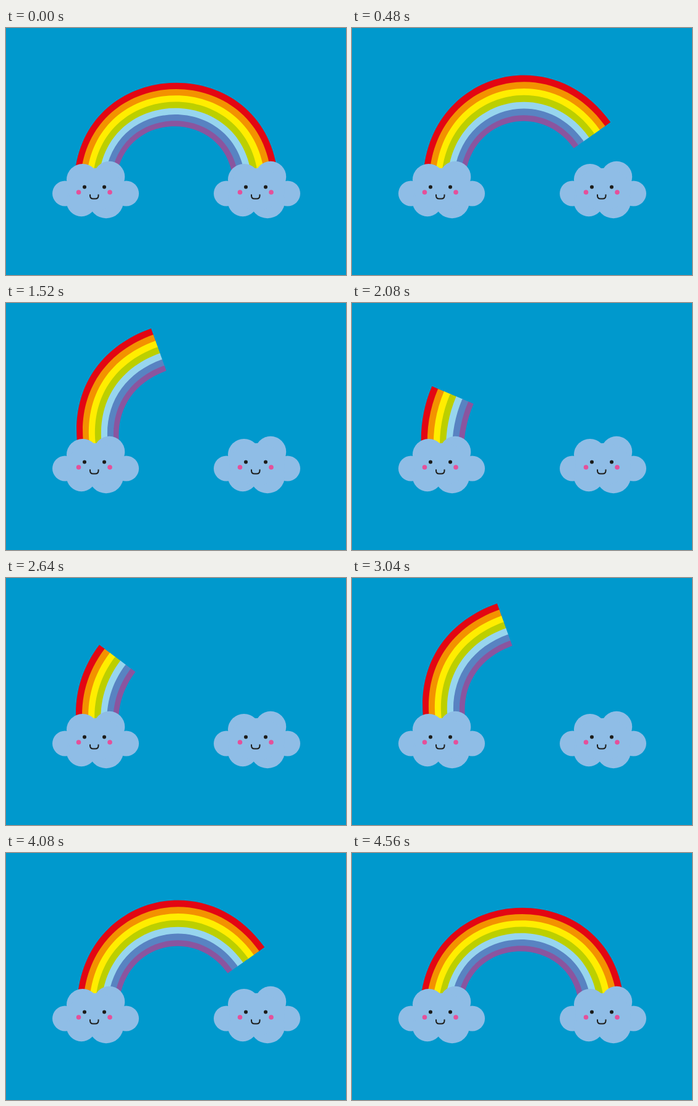
Animation, 550 px wide and 400 px high, one loop 4.76 s. Source, as an HTML page:

```html
<!DOCTYPE html>
<html lang="en">
<head>
<meta charset="utf-8">
<title>Rainbow between clouds</title>
<style>
  html, body { margin: 0; width: 100%; height: 100%; overflow: hidden; background: #0099cd; }
  svg { display: block; width: 550px; height: 400px; }
</style>
</head>
<body>
<svg viewBox="0 0 550 400">
  <defs>
    <g id="cloud">
      <g fill="#8fbde6">
        <circle cx="95.5" cy="268" r="20.5"/>
        <circle cx="194.5" cy="268" r="20.5"/>
        <ellipse cx="124" cy="245.5" rx="26" ry="25.5"/>
        <circle cx="167" cy="241" r="25.2"/>
        <circle cx="122" cy="281" r="24.2"/>
        <circle cx="162" cy="280" r="28.2"/>
        <ellipse cx="145" cy="261" rx="45" ry="34"/>
      </g>
      <g fill="#1d1d1b">
        <circle cx="127" cy="257.5" r="3"/>
        <circle cx="159" cy="257.5" r="3"/>
      </g>
      <g fill="#e5509a">
        <circle cx="117.5" cy="266" r="3.8"/>
        <circle cx="168" cy="266" r="3.8"/>
      </g>
      <path d="M136 269.5v2q0 5 5 5h3.5q5 0 5-5v-2" fill="none" stroke="#1d1d1b" stroke-width="2"/>
    </g>
  </defs>
  <rect width="550" height="400" fill="#0099cd"/>
  <g id="rainbow"></g>
  <use href="#cloud"/>
  <use href="#cloud" x="261"/>
</svg>
<script>
const STEP = 80, LOOP = 4760, LAST = 28;
const BASE_Y = 240, BASE_HALF = 34, TIP_HALF = 36.5;
const COLORS = ['#e30613', '#f39200', '#ffed00', '#bccf00', '#97d5ee', '#5883c2', '#8a559f'];

// Path of the middle of the rainbow's free end: step, x, y.
const TIP_PATH = [
  [0, 403, 238], [7, 386, 163], [12, 352, 126.5], [14, 326, 99],
  [19, 247, 75.5], [21, 206, 102], [26, 163, 149], [LAST, 151, 177]
];

const mix = (a, b, u) => a.map((v, i) => v + (b[i] - v) * u);

const rainbow = document.getElementById('rainbow');
const bands = COLORS.map(color => {
  const path = document.createElementNS('http://www.w3.org/2000/svg', 'path');
  path.setAttribute('fill', color);
  return rainbow.appendChild(path);
});

function tipAt(step) {
  const i = Math.max(1, TIP_PATH.findIndex(key => key[0] >= step));
  const [from, to] = [TIP_PATH[i - 1], TIP_PATH[i]];
  return mix(from, to, (step - from[0]) / (to[0] - from[0])).slice(1);
}

// Near-circular cubic from the base to a tip with the given heading.
function arc(x0, y0, x1, y1, heading, fullness) {
  const chord = Math.hypot(x1 - x0, y1 - y0);
  const slope = Math.atan2(y0 - y1, x1 - x0);
  const halfTurn = slope - heading;
  const handle = fullness * chord * 2 / 3 / (1 + Math.cos(halfTurn));
  const lean = slope + halfTurn;
  return [
    x0, y0,
    x0 + handle * Math.cos(lean), y0 - handle * Math.sin(lean),
    x1 - handle * Math.cos(heading), y1 + handle * Math.sin(heading),
    x1, y1
  ];
}

function edgesAt(step) {
  const [x, y] = tipAt(step);
  const heading = (-83 + 4.4 * step + 0.053 * step * step) * Math.PI / 180;
  const swell = Math.sin(Math.PI * step / LAST);
  const base = 145 + 7 * swell;
  return [1, -1].map(side => arc(
    base - side * BASE_HALF, BASE_Y,
    x - side * TIP_HALF * Math.sin(heading), y - side * TIP_HALF * Math.cos(heading),
    heading, 1 + 0.09 * swell
  ));
}

function draw(time) {
  const tick = Math.floor((time % LOOP) / STEP);
  const step = Math.max(0, Math.min(tick, LAST, 2 * LAST + 1 - tick));
  const [outer, inner] = edgesAt(step);
  bands.forEach((band, i) => {
    // A small overlap keeps seams from showing between bands.
    const [ax, ay, ...out] = mix(outer, inner, i * 1.02 / 7);
    const [bx, by, cx, cy, dx, dy, ex, ey] = mix(outer, inner, Math.min(1, (i + 1.25) / 7));
    band.setAttribute('d', `M${ax} ${ay}C${out.join(' ')}L${ex} ${ey}C${dx} ${dy} ${cx} ${cy} ${bx} ${by}Z`);
  });
}

const start = performance.now();
function loop() {
  draw(performance.now() - start);
  requestAnimationFrame(loop);
}
loop();
</script>
</body>
</html>
```
